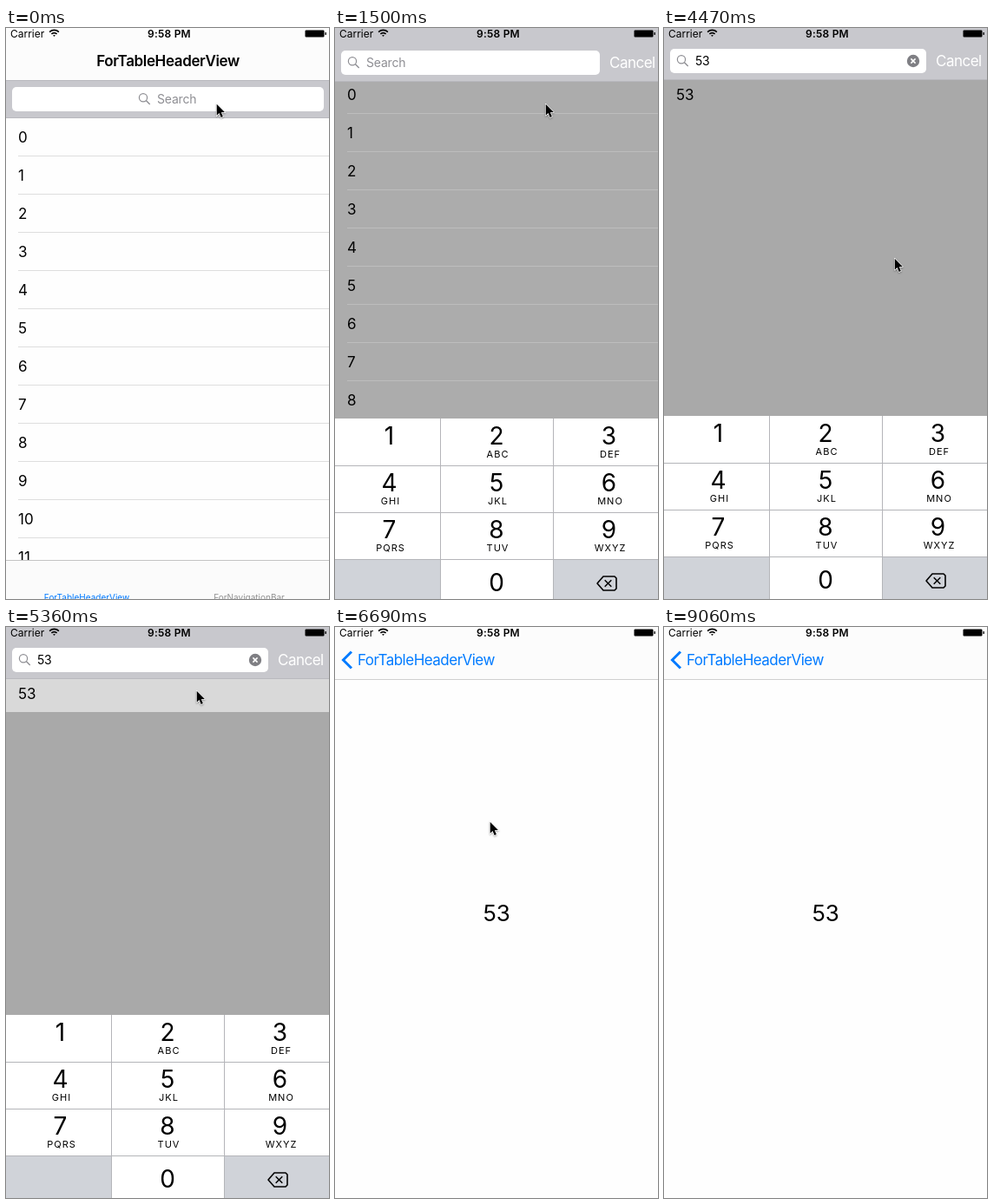
Animation, 372 px wide and 658 px high, one loop 9340 ms. Source, as an HTML page with a canvas:

```html
<!DOCTYPE html>
<html>
<head>
<meta charset="utf-8">
<style>
  html, body { margin: 0; height: 100%; overflow: hidden; background: #fff; }
  canvas { display: block; width: 372px; height: 658px; }
</style>
</head>
<body>
<canvas id="stage" width="372" height="658"></canvas>
<script>
const W = 372, H = 658, LOOP = 9340, STEP = 148.2;
const BLUE = '#007aff', HINT = '#8e8e93', TITLE = 'ForTableHeaderView';
const g = document.getElementById('stage').getContext('2d');

const clamp = x => Math.max(0, Math.min(1, x));
const mix = (a, b, p) => a + (b - a) * p;
const smooth = x => x * x * (3 - 2 * x);
const gray = v => `rgb(${v},${v},${v})`;
// Critically damped spring from 0 to 1
const spring = (t, w) => t <= 0 ? 0 : 1 - (1 + w * t) * Math.exp(-w * t);

function rect(x, y, w, h, color) {
  g.fillStyle = color;
  g.fillRect(x, y, w, h);
}

function text(s, x, y, size, { color = '#000', weight = 400, align = 'left', gap = -size * 0.03 } = {}) {
  g.font = `${weight} ${size}px Inter, Roboto, sans-serif`;
  g.letterSpacing = gap + 'px';
  g.textAlign = align;
  g.fillStyle = color;
  g.fillText(s, x, y);
}

function line(color, width, ...points) {
  g.strokeStyle = color;
  g.lineWidth = width;
  g.beginPath();
  points.forEach(([x, y]) => g.lineTo(x, y));
  g.stroke();
}

function cross(x, y, r, color) {
  line(color, 1.5, [x - r, y - r], [x + r, y + r]);
  line(color, 1.5, [x + r, y - r], [x - r, y + r]);
}

// Pointer stops: step, x, y
const POINTER = [
  [10, 242, 87], [14, 199, 531], [18, 199, 533], [22, 311, 457], [28, 311, 457], [32, 219, 73],
  [43, 219, 73], [45, 178, 224], [49, 130, 250], [52, 96, 255], [54, 190, 320], [57, 372, 670]
];

function drawPointer(k) {
  const i = POINTER.findIndex(stop => stop[0] > k);
  const b = POINTER[i < 0 ? POINTER.length - 1 : i];
  const a = i > 0 ? POINTER[i - 1] : b;
  const p = a === b ? 0 : smooth((k - a[0]) / (b[0] - a[0]));
  g.save();
  g.translate(mix(a[1], b[1], p) + 0.7, mix(a[2], b[2], p) + 0.7);
  g.scale(0.9, 0.9);
  g.beginPath();
  [[0, 0], [0, 14.5], [3.2, 11.5], [5.5, 17], [8, 16], [5.7, 10.6], [10.2, 10.4]].forEach(q => g.lineTo(...q));
  g.closePath();
  g.shadowColor = 'rgba(0,0,0,.35)';
  g.shadowBlur = 2;
  g.shadowOffsetY = 1;
  g.strokeStyle = '#fff';
  g.lineWidth = 1.6;
  g.stroke();
  g.shadowColor = 'transparent';
  g.fillStyle = '#000';
  g.fill();
  g.restore();
}

function drawStatus() {
  text('Carrier', 5, 10.5, 12, { gap: 0 });
  text('9:58 PM', 188, 10.5, 12, { weight: 600, align: 'center', gap: 0.2 });
  g.strokeStyle = '#000';
  g.lineWidth = 1.6;
  for (const r of [1.2, 4.4, 7.6]) {
    g.beginPath();
    g.arc(55.5, 10, r, -Math.PI * 0.75, -Math.PI * 0.25);
    g.stroke();
  }
  g.strokeStyle = 'rgba(0,0,0,.5)';
  g.lineWidth = 1;
  g.beginPath();
  g.roundRect(344.5, 2.5, 22, 8, 1.5);
  g.stroke();
  rect(345, 3, 21, 7, '#000');
  rect(367.5, 5, 1.3, 3, '#000');
}

function drawRows(k, active, dim) {
  const top = 103 - Math.round(49 * clamp((active - 0.02) / 0.93));
  rect(0, 0, W, H, gray(mix(254, 169, dim)));
  let rows = Array.from({ length: 13 }, (_, i) => i);
  if (k >= 18 && k < 24) rows = [5, 15, 25, 35, 45, 50, 51, 52, 53];
  if (k >= 24 && k < 37) rows = [53];
  if (k >= 35 && k < 37) rect(0, top, W, 44, '#d9d9d9');
  rows.forEach((n, i) => {
    const y = top + 44 * i;
    text(n, 14, y + 29, 17, { gap: 0 });
    if (rows.length > 1) rect(14, y + 44, W, 1, gray(mix(222, 188, dim)));
  });
}

function drawSearch(k, active) {
  const top = Math.round(60 - 63 * active);
  const bottom = Math.round(mix(104, 60, active));
  rect(0, top, W, bottom - top, '#c8c8cd');
  rect(0, bottom - 1, W, 1, '#b9b9be');
  if (active < 0.9) rect(0, top, W, 1, '#b9b9be');

  const y = Math.round(68 - 44 * active), width = Math.round(359 - 64 * active);
  g.fillStyle = '#fff';
  g.beginPath();
  g.roundRect(7, y, width, 28, 5);
  g.fill();

  const align = smooth(clamp((active - 0.1) / 0.85));
  const x = Math.floor(mix(7 + (width - 66) / 2, 15, align));
  g.strokeStyle = HINT;
  g.lineWidth = 1.2;
  g.beginPath();
  g.arc(x + 5, y + 12.3, 4.6, 0, 7);
  g.stroke();
  line(HINT, 1.4, [x + 8.3, y + 15.6], [x + 12.7, y + 20]);

  const typed = k < 18 || k >= 37 ? '' : k < 24 ? '5' : '53';
  text(typed || 'Search', x + 21, y + 19, 14, { color: typed ? '#000' : HINT, gap: -0.2 });
  const blink = (k >= 11 && k < 15) || (k >= 18 && k < 28) || (k >= 32 && k < 35);
  if (blink) rect(x + 21 + (typed ? g.measureText(typed).width : 0), y + 5, 2, 17, '#3f6be0');
  if (typed) {
    g.fillStyle = '#7f7f84';
    g.beginPath();
    g.arc(287, y + 14, 7.2, 0, 7);
    g.fill();
    cross(287, y + 14, 2.6, '#fff');
  }
  text('Cancel', 313 + 64 * (1 - active), y + 19.5, 17, { color: '#fff' });
}

function drawTabs() {
  rect(0, 613, W, 45, '#fbfbfb');
  rect(0, 613, W, 1, '#c4c4c4');
  text(TITLE, 93, 660, 10, { color: BLUE, align: 'center', gap: 0 });
  text('ForNavigationBar', 280, 660, 10, { color: '#929292', align: 'center', gap: 0 });
}

const LETTERS = ['', 'ABC', 'DEF', 'GHI', 'JKL', 'MNO', 'PQRS', 'TUV', 'WXYZ'];

function drawKeyboard(shown) {
  if (shown < 0.004) return;
  const top = Math.round(mix(H, 447, shown)), edge = '#b4b5b9', centers = [62.5, 186, 315.5];
  rect(0, top, W, 220, '#fff');
  rect(0, top + 162, 121, 60, '#d0d3d9');
  rect(252, top + 162, 120, 60, '#d0d3d9');
  for (const x of [121, 251]) rect(x, top, 1, 220, edge);
  for (const y of [54, 108, 162]) rect(0, top + y, W, 1, edge);
  LETTERS.forEach((s, i) => {
    const x = centers[i % 3], y = top + 54 * Math.floor(i / 3);
    text(i + 1, x, y + 30, 28, { align: 'center', gap: 0 });
    text(s, x + 1.5, y + 45, 11, { align: 'center', gap: 1 });
  });
  text('0', 186, top + 199, 28, { align: 'center', gap: 0 });
  g.lineJoin = 'round';
  const y = top + 190;
  line('#000', 1.6, [302, y], [309, y - 8], [322, y - 8], [324, y - 6], [324, y + 6], [322, y + 8], [309, y + 8], [302, y], [303, y - 1]);
  cross(314.5, y, 3.8, '#000');
}

function drawNav(active, push, dim) {
  const lift = -Math.round(63 * active);
  rect(0, lift, W, 60, gray(mix(252, 167, dim)));
  if (push > 0) rect(0, 60, W, 1, '#cfcfcf');
  g.globalAlpha = clamp(1 - active * active) * clamp(1 - push * 1.3);
  text(TITLE, 186.5 - 81 * push, 44 + lift, 17, { weight: 600, align: 'center', gap: -0.37 });
  g.globalAlpha = clamp(push * 1.5 - 0.5);
  text(TITLE, Math.round(26 + 80 * (1 - push)), 44, 17, { color: BLUE });
  g.lineJoin = 'miter';
  line(BLUE, 3, [19, 28.5], [9.5, 38], [19, 47.5]);
  g.globalAlpha = 1;
}

function drawDetail(push) {
  const x = Math.floor(W * (1 - push));
  g.save();
  g.shadowColor = 'rgba(0,0,0,.2)';
  g.shadowBlur = 8;
  rect(x, 0, W, H, gray(254));
  g.restore();
  text('53', x + 186, 339, 26, { align: 'center', gap: -0.3 });
}

function draw(now) {
  const k = Math.max(0, Math.floor((now % LOOP - 14) / STEP));
  const active = clamp(spring(k - 7.7, 2.1) - spring(k - 36.15, 2.1));
  const push = spring(k - 42.4, 3.2);
  const dim = active ** 0.85;

  g.clearRect(0, 0, W, H);
  g.save();
  g.translate(-Math.round(W * 0.3 * push), 0);
  drawRows(k, active, dim);
  drawSearch(k, active);
  drawTabs();
  g.restore();
  if (push > 0) drawDetail(push);
  if (active < 0.94) drawNav(active, push, dim);
  drawKeyboard(mix(active, smooth(active), 0.78));
  drawStatus();
  drawPointer(k);
  requestAnimationFrame(draw);
}
requestAnimationFrame(draw);
</script>
</body>
</html>
```
